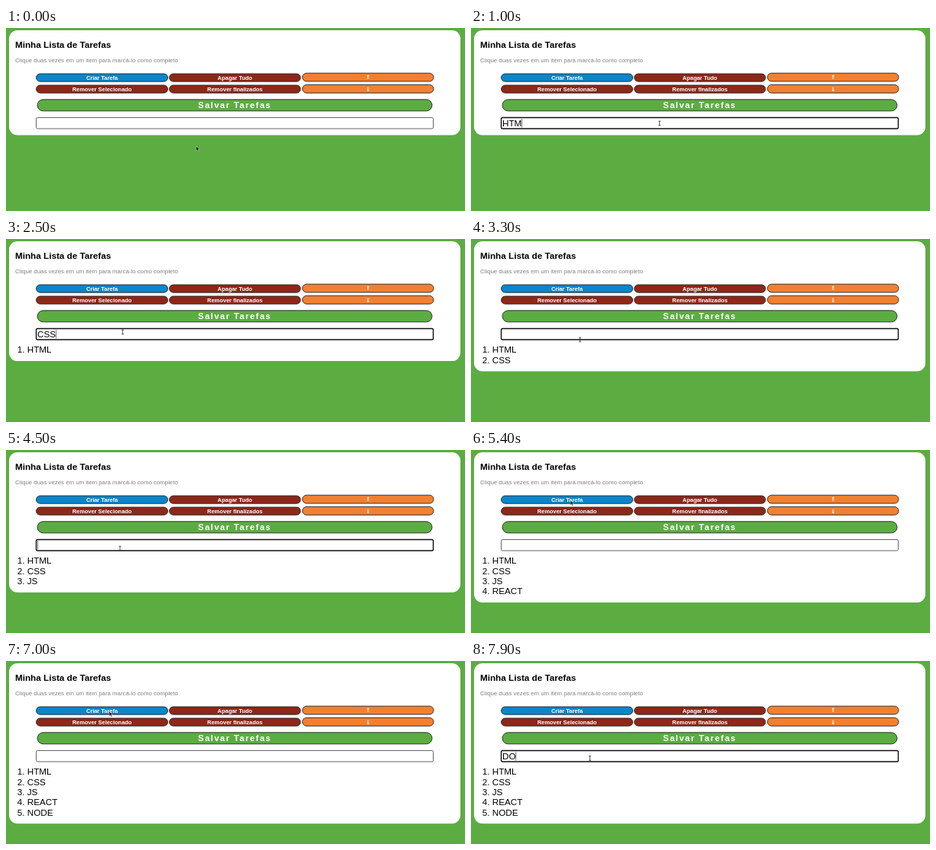
Write an HTML page that moves like this. It is 600x240 px and loops after 8000 ms.

```html
<!DOCTYPE html>
<html lang="pt">
<head>
<meta charset="utf-8">
<title>Minha Lista de Tarefas</title>
<style>
  html, body { margin: 0; width: 100%; height: 100%; overflow: hidden; background: #5bad41; }
  svg { display: block; width: 600px; height: 240px; font-family: "Liberation Sans", Arial, sans-serif; }
  .body { font-size: 11.65px; }
  .button { font-size: 7.45px; font-weight: bold; fill: #fff; text-anchor: middle; }
  .arrow { font-family: "DejaVu Sans", sans-serif; }
  .save { font-size: 11.3px; letter-spacing: 1.4px; }
</style>
</head>
<body>
<svg id="stage" viewBox="0 0 600 240">
  <rect id="card" x="4" y="3" width="590" height="137.5" rx="11" fill="#fff"/>
  <text x="12" y="25.6" font-size="11.7" font-weight="bold">Minha Lista de Tarefas</text>
  <text x="12" y="45.3" font-size="7.84" fill="#808080">Clique duas vezes em um item para marcá-lo como completo</text>
  <g id="buttons"></g>
  <rect id="field" x="39.5" y="117.5" width="519" height="14.5" rx="1.8" fill="#fff"/>
  <text id="typed" class="body" x="41" y="129"></text>
  <rect id="caret" y="119" width="0.7" height="11.5" fill="#444"/>
  <g id="list" class="body"></g>
  <path id="pointer" d="M0 0V6.2L1.5 4.9L2.5 7.2L3.5 6.8L2.5 4.5H4.4Z" fill="#111" stroke="#fff" stroke-width=".4"/>
  <path id="beam" d="M-1.5 -2.8H1.5M0 -2.8V2.8M-1.5 2.8H1.5" fill="none" stroke="#333" stroke-width=".8"/>
</svg>
<script>
const LOOP = 8000, STEP = 100, LINE = 13.3;
const $ = id => document.getElementById(id);

function add(parent, tag, attrs, text = "") {
  const node = document.createElementNS("http://www.w3.org/2000/svg", tag);
  for (const key in attrs) node.setAttribute(key, attrs[key]);
  node.textContent = text;
  parent.append(node);
  return node;
}

function button(x, y, width, height, fill, label, style = "", dy = 2.7) {
  add($("buttons"), "rect", { x, y, width, height, rx: height / 2, fill, stroke: "#252525", "stroke-width": 0.9 });
  add($("buttons"), "text", { x: x + width / 2, y: y + height / 2 + dy, class: "button " + style }, label);
}

const BLUE = "#0a86cb", RED = "#8e2718", ORANGE = "#f2802f", GREEN = "#5bad41";
button(39.5, 60, 172, 10.2, BLUE, "Criar Tarefa");
button(213.5, 60, 171.5, 10.2, RED, "Apagar Tudo");
button(387.5, 59.2, 171.5, 10.8, ORANGE, "⇑", "arrow");
button(39.5, 75, 172, 10.2, RED, "Remover Selecionado");
button(213.5, 75, 171.5, 10.2, RED, "Remover finalizados");
button(387.5, 74.4, 171.5, 10.8, ORANGE, "⇓", "arrow");
button(41, 93.8, 516, 15, GREEN, "Salvar Tarefas", "save", 3.9);

// Each task: focus time, first key, key interval, click on the create button
const tasks = [
  { text: "HTML", focus: 600, start: 800, gap: 70, done: 1700 },
  { text: "CSS", focus: 2200, start: 2300, gap: 100, done: 2900 },
  { text: "JS", focus: 3300, start: 3500, gap: 100, done: 4100 },
  { text: "REACT", focus: 4400, start: 4600, gap: 90, done: 5400 },
  { text: "NODE", focus: 5900, start: 6100, gap: 100, done: 6900 },
  { text: "DO", focus: 7500, start: 7800, gap: 100, done: Infinity }
];

// time, x, y
const route = [
  [0, 248.5, 155], [100, 248.5, 155], [600, 246.5, 125], [1000, 246.5, 125],
  [1600, 125, 66], [1800, 125, 66], [2200, 152.5, 122], [2500, 152.5, 122],
  [2800, 128, 66], [3000, 128, 66], [3300, 142.5, 132], [3400, 148, 128],
  [3600, 148, 128], [4000, 130, 66], [4200, 130, 66], [4500, 149, 129],
  [4900, 149, 129], [5200, 130, 66], [5500, 130, 66], [5900, 147, 131.5],
  [6400, 147, 131.5], [6800, 135, 66], [7100, 135, 66], [7500, 155.5, 127.5],
  [LOOP, 155.5, 127.5]
];

const rows = tasks.slice(0, 5).map((task, i) => {
  const row = add($("list"), "g", {});
  const y = 149.4 + i * LINE;
  add(row, "text", { x: 14.8, y }, i + 1 + ".");
  add(row, "text", { x: 27.8, y }, task.text);
  return row;
});

function position(t) {
  const i = route.findIndex(point => point[0] > t);
  const [t0, x0, y0] = route[i - 1], [t1, x1, y1] = route[i];
  const p = (t - t0) / (t1 - t0), ease = p * p * (3 - 2 * p);
  return [x0 + (x1 - x0) * ease, y0 + (y1 - y0) * ease];
}

const show = (node, on) => node.setAttribute("visibility", on ? "visible" : "hidden");

function draw(time) {
  const t = Math.floor((time % LOOP) / STEP) * STEP;

  const count = tasks.filter(task => t >= task.done).length;
  rows.forEach((row, i) => show(row, i < count));
  $("card").setAttribute("height", 137.5 + (count ? 6.3 + count * LINE : 0));

  const task = tasks[count];
  const focused = t >= task.focus;
  $("field").setAttribute("stroke", focused ? "#101010" : "#555");
  $("field").setAttribute("stroke-width", focused ? 1.4 : 0.9);

  const keys = Math.max(0, Math.floor((t - task.start) / task.gap) + 1);
  $("typed").textContent = task.text.slice(0, keys);
  $("caret").setAttribute("x", 41 + (keys > 0 ? $("typed").getComputedTextLength() : 0));
  show($("caret"), focused && t >= task.start - STEP);

  const [x, y] = position(t);
  const overField = y > 117 && y < 133;
  show($("beam"), overField);
  show($("pointer"), !overField);
  for (const id of ["beam", "pointer"]) $(id).setAttribute("transform", `translate(${x} ${y})`);
}

const origin = performance.now();
function tick() {
  draw(performance.now() - origin);
  requestAnimationFrame(tick);
}
tick();
</script>
</body>
</html>
```
